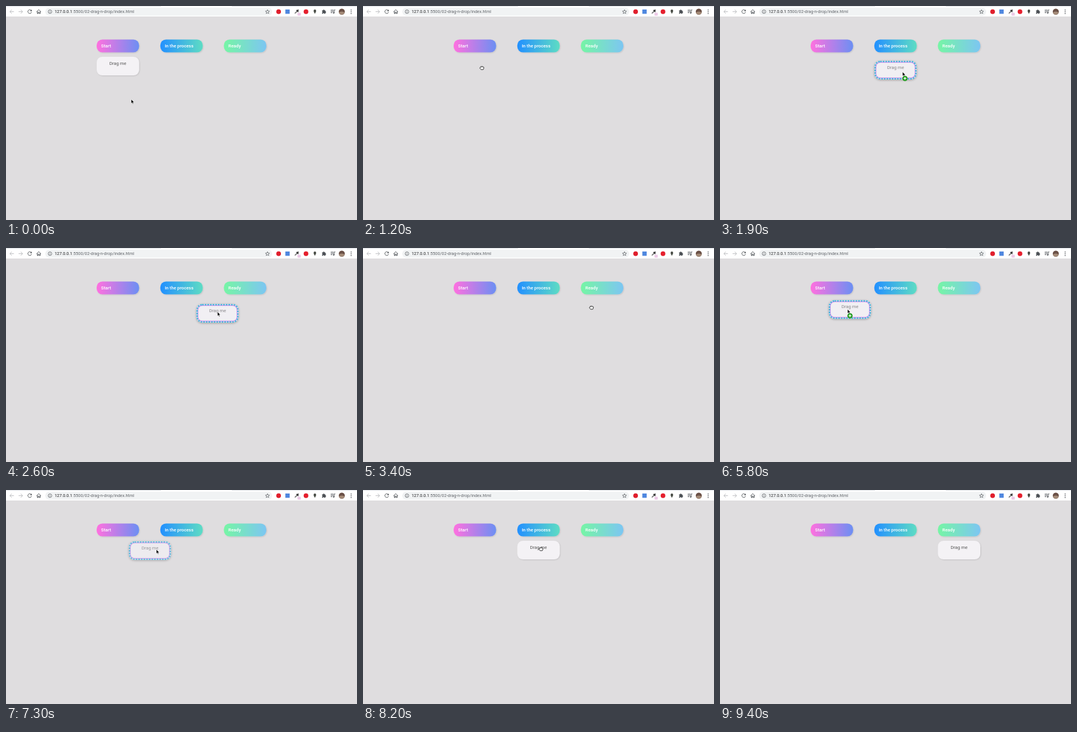
These frames come from a looping animation (600x367 px, 9500 ms). An HTML page:

```html
<!DOCTYPE html>
<html lang="en">
<head>
<meta charset="utf-8">
<title>Drag and drop</title>
<style>
  html, body { margin: 0; width: 100%; height: 100%; overflow: hidden; background: #dfdddf; }
  svg { display: block; width: 600px; height: 367px; font-family: Roboto, sans-serif; }
  .icon { fill: none; stroke: #55595d; stroke-width: 1; }
  .label { font-size: 7.75px; }
  .head { fill: #fff; font-weight: 500; }
</style>
</head>
<body>
<svg viewBox="0 0 600 367">
  <defs>
    <filter id="soft" x="-20%" y="-40%" width="150%" height="200%">
      <feDropShadow dx="1" dy="1" stdDeviation="1.2" flood-opacity=".13"/>
    </filter>
    <filter id="lifted" x="-20%" y="-40%" width="140%" height="200%">
      <feDropShadow dx="0" dy="1" stdDeviation="2" flood-opacity=".38"/>
    </filter>
  </defs>
  <rect width="600" height="367" fill="#dfdddf"/>

  <g id="toolbar">
    <rect width="600" height="18" fill="#fff"/>
    <path d="M0 .5H265M386 .5H600" stroke="#dee1e6"/>
    <rect x="67" y="3" width="388" height="13.4" rx="6.7" fill="#f1f3f4"/>
    <g class="icon">
      <path d="M13.5 9.7H6.8M9.8 6.5L6.6 9.7L9.8 12.9M21.5 9.7H28.2M25.2 6.5L28.4 9.7L25.2 12.9" stroke="#b9bbbe"/>
      <path d="M43 7.5A3.2 3.2 0 1 0 43.7 10.4"/>
      <path d="M44 6V9H41Z" fill="#55595d" stroke="none"/>
      <path d="M52.2 10L56 6.3L59.8 10M53.5 9.2V13H55.2V10.5H56.8V13H58.5V9.2"/>
      <circle cx="75.2" cy="9.7" r="3.1" stroke-width=".8"/>
      <path d="M75.2 9.2V11.5M75.2 7.7V8.5" stroke-width=".8"/>
      <path d="M447 6.4L448 8.7L450.5 8.9L448.6 10.5L449.2 12.9L447 11.6L444.8 12.9L445.4 10.5L443.5 8.9L446 8.7Z" stroke-width=".8"/>
    </g>
    <text x="83" y="12.2" font-size="7.3" fill="#5f6368"><tspan fill="#202124">127.0.0.1</tspan>:5500/02-drag-n-drop/index.html</text>
    <circle cx="466" cy="9.7" r="4" fill="#e01f2d"/>
    <rect x="477.5" y="6" width="7.4" height="7.4" fill="#4f87df"/>
    <path d="M493.3 13.4L494 11.3L497.5 7.8L498.8 9.1L495.3 12.6Z" fill="#777"/>
    <path d="M496.6 7L499.8 10.1M498 8.5L500 6.5" stroke="#333" stroke-width="1.8"/>
    <rect x="498.3" y="11.4" width="5.5" height="5" rx=".6" fill="#ecc9e6"/>
    <circle cx="512.8" cy="9.7" r="4" fill="#e5202e"/>
    <path d="M528 13.8C527.5 11.5 525.8 10.3 525.8 8.3A2.2 2.2 0 0 1 530.2 8.3C530.2 10.3 528.5 11.5 528 13.8Z" fill="#4b4f48"/>
    <path d="M540.3 7.5H542A1.2 1.2 0 0 1 544.4 7.5H546V9.2A1.2 1.2 0 0 1 546 11.6V13.2H544.2A1.2 1.2 0 0 0 541.9 13.2H540.3V11.4A1.2 1.2 0 0 0 540.3 9.2Z" fill="#4d5156"/>
    <path d="M555 7H560M555 9.2H560M555 11.4H558M561 11.8V6.8H563" class="icon"/>
    <circle cx="560.2" cy="11.8" r="1.3" fill="#55595d"/>
    <circle cx="574" cy="9.7" r="5.2" fill="#6b5147"/>
    <path d="M569 11A5.2 5.2 0 0 0 579 11Q574 8 569 11Z" fill="#a48b78"/>
    <g fill="#55595d"><circle cx="590" cy="6.8" r=".9"/><circle cx="590" cy="9.8" r=".9"/><circle cx="590" cy="12.8" r=".9"/></g>
  </g>

  <g id="columns"></g>

  <g id="card">
    <rect width="72.5" height="32" rx="9.7" fill="#f4f2f5" filter="url(#soft)"/>
    <text class="label" x="36.2" y="13.8" text-anchor="middle" fill="#555">Drag me</text>
  </g>

  <g id="ghost">
    <rect x=".5" y=".5" width="71" height="31" rx="9" fill="#f2f0f4" filter="url(#lifted)"/>
    <g fill="none">
      <rect x="1.2" y="1.2" width="69.6" height="29.6" rx="8.6" stroke="#d6d9ee" stroke-width="2.6"/>
      <rect x="2.6" y="2.6" width="66.8" height="26.8" rx="7.4" stroke="#d383ee" stroke-width="1.1"/>
      <rect x="1.2" y="1.2" width="69.6" height="29.6" rx="8.6" stroke="#42b6dc" stroke-width="2.5" stroke-dasharray="2.6 1.9"/>
    </g>
    <text class="label" x="36.2" y="13.8" text-anchor="middle" fill="#858387">Drag me</text>
  </g>

  <g id="pointer">
    <path id="arrow" d="M0 0V7.2L1.7 5.7L2.8 8.2L4 7.7L2.9 5.2H5.2Z" fill="#000" stroke="#fff" stroke-width=".6"/>
    <g id="hand" stroke="#111" stroke-width=".9" stroke-linejoin="round" fill="#fff">
      <path d="M-2.2 -1.6Q-1.4 -2.9 -.5 -2Q.4 -3 1.2 -2Q2.2 -2.6 2.6 -1.5Q3.6 -1.6 3.5 0Q3.4 1.8 2.5 3H-1.2Q-3 1.5 -3.3 .4Q-3.2 -.6 -2.2 -.3Z"/>
      <path d="M-.5 -1.9V-.6M1.2 -1.9V-.6" stroke-width=".6"/>
    </g>
    <g id="plus">
      <circle cx="4.2" cy="11.2" r="4.5" fill="#259c22"/>
      <path d="M1.8 11.2H6.6M4.2 8.8V13.6" stroke="#fff" stroke-width="1.3"/>
    </g>
  </g>
</svg>
<script>
const LOOP = 9500, STEP = 100, CARD_TOP = 87, COLUMN_WIDTH = 72.5, CURSOR_GONE = 9200;
const columns = [
  { title: 'Start', x: 155, colors: ['#ff70df', '#6c8ff3'] },
  { title: 'In the process', x: 263.8, colors: ['#2390ff', '#5edcc4'] },
  { title: 'Ready', x: 372.5, colors: ['#76f5a5', '#7cc6f2'] },
];

// Cursor stops: time, x, y
const stops = [
  [0, 214, 160], [200, 213.6, 160.8], [500, 213.6, 160.8], [1000, 203, 106], [1400, 203, 106],
  [1900, 312, 113], [2000, 312, 112], [2200, 300, 100.5], [2300, 300, 100.5], [2600, 361.5, 109.5],
  [2900, 409, 106], [3000, 409, 104], [3300, 390.3, 102], [3600, 390.3, 102], [4400, 237, 103],
  [4500, 231, 103], [4900, 282, 104], [5000, 282, 103], [5300, 296, 102.5], [5500, 296, 102.5],
  [5800, 218, 105], [6100, 185, 104], [6200, 185, 103], [6700, 202, 101], [6900, 202, 101],
  [7300, 257, 102], [7600, 311, 103], [7700, 311, 102], [8200, 304, 101], [8400, 304, 101],
  [8900, 416, 102], [9500, 416, 102],
];

// hold: pick-up point inside the card
const drags = [
  { start: 1100, shown: 1400, end: 2000, hold: [48, 19], to: 1 },
  { start: 2200, shown: 2300, end: 3000, hold: [36, 13.5], to: 2 },
  { start: 3400, shown: 3500, end: 5000, hold: [17.7, 15], to: 1 },
  { start: 5400, shown: 5500, end: 6200, hold: [32, 15.5], to: 0 },
  { start: 6800, shown: 6900, end: 7700, hold: [47, 14], to: 1, opacity: .78 },
  { start: 8300, shown: 8400, end: 9000, hold: [40, 14], to: 2 },
];

const el = id => document.getElementById(id);
const show = (id, on) => el(id).setAttribute('visibility', on ? 'visible' : 'hidden');
const place = (id, x, y) => el(id).setAttribute('transform', `translate(${x} ${y})`);

el('columns').innerHTML = columns.map(({ title, x, colors }, i) => `
  <linearGradient id="tint${i}">
    <stop stop-color="${colors[0]}"/><stop offset="1" stop-color="${colors[1]}"/>
  </linearGradient>
  <rect x="${x}" y="57.5" width="${COLUMN_WIDTH}" height="22" rx="9.7" fill="url(#tint${i})" filter="url(#soft)"/>
  <text class="label head" x="${x + 7.6}" y="71.2">${title}</text>`).join('');

function cursorAt(t) {
  const i = stops.findIndex(stop => stop[0] > t);
  const [t0, x0, y0] = stops[i - 1], [t1, x1, y1] = stops[i];
  const k = (t - t0) / (t1 - t0);
  return [x0 + (x1 - x0) * k, y0 + (y1 - y0) * k];
}

function render(t) {
  const [x, y] = cursorAt(t);
  const drag = drags.find(d => t >= d.start && t < d.end);
  const lifted = Boolean(drag) && t >= drag.shown;
  const dropped = drags.filter(d => t >= d.end).pop();
  const home = columns[dropped ? dropped.to : 0].x;
  const overCard = x > home && x < home + COLUMN_WIDTH && y > CARD_TOP && y < CARD_TOP + 32;
  const overColumn = columns.some(c => x > c.x && x < c.x + COLUMN_WIDTH);
  const cursor = t < CURSOR_GONE;
  const hand = !lifted && (Boolean(drag) || overCard);

  place('card', home, CARD_TOP);
  show('card', !drag);
  if (lifted) {
    place('ghost', x - drag.hold[0], y - drag.hold[1]);
    el('ghost').setAttribute('opacity', drag.opacity || .97);
  }
  show('ghost', lifted);
  place('pointer', x, y);
  show('arrow', cursor && !hand);
  show('hand', cursor && hand);
  show('plus', cursor && lifted && overColumn);
}

const begin = performance.now();
function tick() {
  const t = (performance.now() - begin) % LOOP;
  render(Math.floor(t / STEP) * STEP);
  requestAnimationFrame(tick);
}
tick();
</script>
</body>
</html>
```
